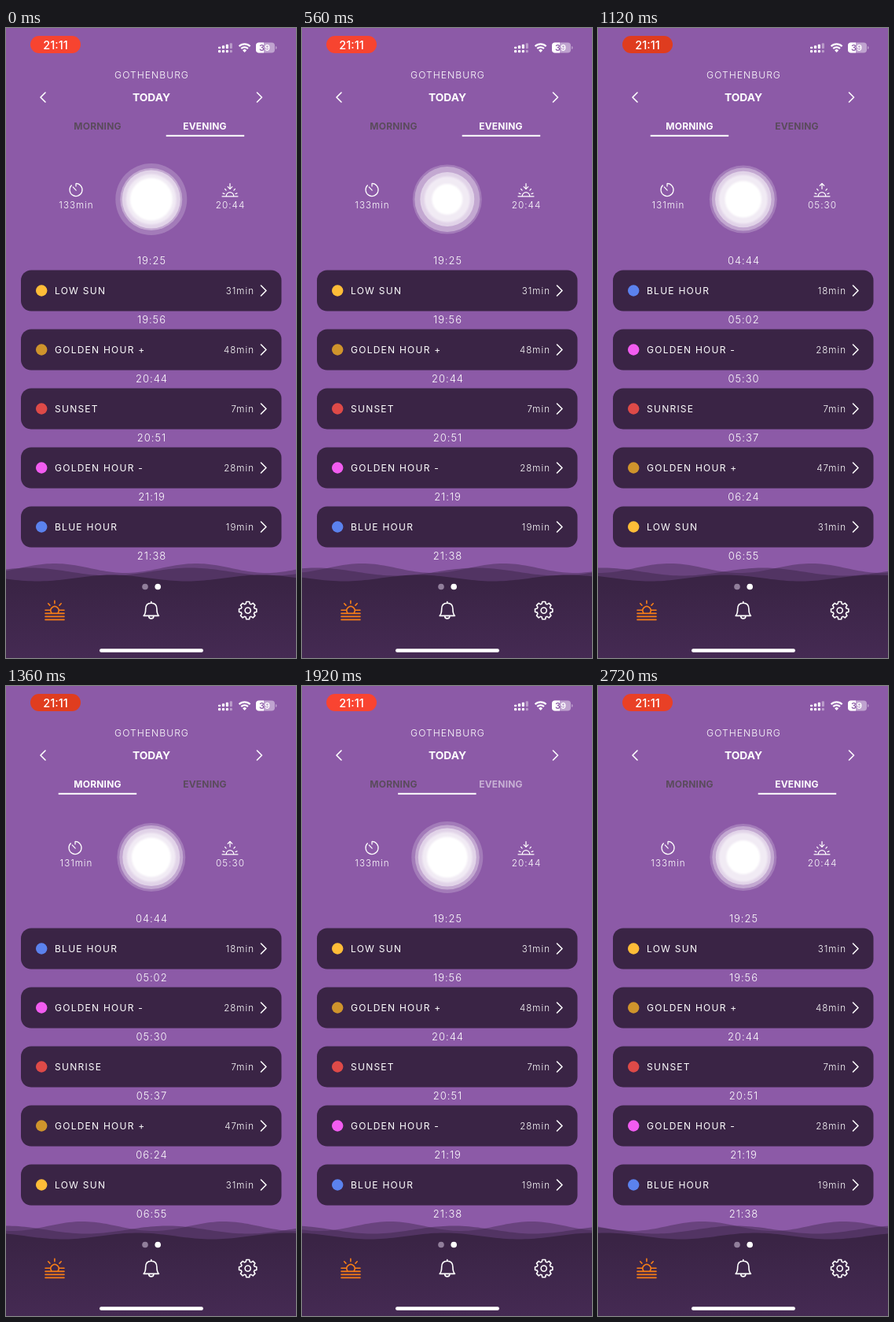
An HTML page for the animation above (2800 ms loop, 369 by 800 pixels).

```html
<!DOCTYPE html>
<html lang="en">
<head>
<meta charset="utf-8">
<title>Sun times</title>
<style>
html, body { margin: 0; width: 100%; height: 100%; overflow: hidden; background: #8c5aa7; }
svg { display: block; width: 369px; height: 800px; font-family: Inter, sans-serif; }
text { fill: #fff; }
.mid { text-anchor: middle; }
.end { text-anchor: end; }
.light { font-weight: 300; letter-spacing: 1px; }
.tab { font-size: 12px; font-weight: 700; letter-spacing: .2px; }
.line { fill: none; stroke: #fff; stroke-width: 1.6; stroke-linecap: round; stroke-linejoin: round; }
.thin { stroke-width: 1.25; }
.hot { stroke: #f97f16; }
</style>
</head>
<body>
<svg viewBox="0 0 369 800">
  <defs>
    <linearGradient id="floor" x1="0" y1="0" x2="0" y2="1">
      <stop offset="0" stop-color="#3a2445"/><stop offset="1" stop-color="#452a53"/>
    </linearGradient>
    <filter id="soft" x="-20%" y="-20%" width="140%" height="140%"><feGaussianBlur stdDeviation=".8"/></filter>
  </defs>
  <rect width="369" height="800" fill="#8c5aa7"/>

  <rect id="pill" x="31" y="10" width="64" height="22" rx="11"/>
  <text class="mid" x="63" y="26.5" font-size="14.5" font-weight="500">21:11</text>
  <g id="signal" fill="#fff"></g>
  <g fill="none" stroke="#fff" stroke-width="2.3">
    <path d="M296.6 23.2a10 10 0 0 1 14 0M299.3 26.2a6.2 6.2 0 0 1 8.6 0"/>
    <path d="M303.6 31l-2.5-2.6a3.5 3.5 0 0 1 5 0z" fill="#fff" stroke="none"/>
  </g>
  <rect x="318" y="18.5" width="24" height="13" rx="4" fill="#bfa3cf"/>
  <path d="M328 18.5h-6a4 4 0 0 0-4 4v5a4 4 0 0 0 4 4h6z" fill="#fff"/>
  <path d="M343 23v4q1.6-.6 1.6-2t-1.6-2z" fill="#bfa3cf"/>
  <text x="322" y="29" font-size="11" font-weight="600" style="fill:#8c5aa7">3<tspan fill="#fff">9</tspan></text>

  <text class="mid light" x="185.5" y="63.5" font-size="12.2">GOTHENBURG</text>
  <text class="mid" x="185" y="92.5" font-size="13.8" font-weight="700">TODAY</text>
  <path class="line" d="M50 82l-6 6 6 6M319.5 82l6 6-6 6"/>
  <text id="am" class="mid tab" x="116.5" y="128.5">MORNING</text>
  <text id="pm" class="mid tab" x="253" y="128.5">EVENING</text>
  <rect id="bar" y="135.8" width="99.5" height="2" fill="#fff"/>

  <g id="sun" fill="#fff"></g>

  <path id="timer" class="line thin" d="M0-4.6V-8A8 8 0 1 1-5.6-5.7M-3.8-3.6L.2.6"/>
  <text id="span" class="mid light" x="89.5" y="229" font-size="11.6"></text>
  <path class="line thin" d="M275 213.8h20M280.2 213.5a4.8 4.8 0 1 1 9.6 0M276 209.8l2 .8M294 209.8l-2 .8M278.6 204.4l1.5 1.7M291.4 204.4l-1.5 1.7M285 197.6v6.6"/>
  <path id="arrow" class="line thin"/>
  <text id="peak" class="mid light" x="285.5" y="229" font-size="11.8"></text>

  <g id="list"></g>

  <path id="w0" fill="#3a2445" opacity=".42"/>
  <path id="w1" fill="#3a2445" opacity=".48"/>
  <path id="w2" fill="#3a2445"/>
  <rect y="705" width="369" height="95" fill="url(#floor)"/>
  <circle cx="177" cy="709.5" r="3.8" fill="#917f9b"/>
  <circle cx="193.2" cy="709.5" r="3.8" fill="#fff"/>

  <path class="line hot" d="M50 739.2h6.5M67.5 739.2h6.5M50 743.4h24M50 747.4h24M50 751.4h24M57.7 742.4a5.1 5.1 0 1 1 8.6 0M61.9 727.4v3.4M53.7 730.8l2.2 2.3M70.2 730.8l-2.2 2.3"/>
  <path class="line" d="M184.8 728.6v1.6M175.2 746.4h19.2c-2-2-2.5-3.6-2.5-8.6 0-4.8-2.8-7.6-7.1-7.6s-7.1 2.8-7.1 7.6c0 5-.5 6.600-2.500 8.600zM181.700 746.800a3.100 3.100 0 0 0 6.200 0"/>
  <path id="gear" class="line"/>
  <circle class="line" cx="307.700" cy="739.600" r="3.600"/>
  <rect x="119" y="788.300" width="132" height="4.400" rx="2.200" fill="#fff"/>
</svg>
<script>
const LOOP = 2800, STEP = 80, SLIDE = 250;
const TO_AM = 777, TO_PM = 1811;
const $ = id => document.getElementById(id);
const set = (el, attrs) => { for (const k in attrs) el.setAttribute(k, attrs[k]); };
const clamp = v => Math.max(0, Math.min(1, v));
const smooth = v => v * v * (3 - 2 * v);
const mix = (a, b, k) => a + (b - a) * k;

const COLORS = { 'LOW SUN': '#ffbd38', 'GOLDEN HOUR +': '#cf942c', 'SUNSET': '#de4a48',
  'SUNRISE': '#de4a48', 'GOLDEN HOUR -': '#f25cf0', 'BLUE HOUR': '#5b82ee' };
const EVENING = {
  span: '133min', peak: '20:44', timerX: 89, arrow: 'M282.200 201.600l2.800 2.800 2.800-2.800',
  names: ['LOW SUN', 'GOLDEN HOUR +', 'SUNSET', 'GOLDEN HOUR -', 'BLUE HOUR'],
  mins: [31, 48, 7, 28, 19],
  times: ['19:25', '19:56', '20:44', '20:51', '21:19', '21:38']
};
const MORNING = {
  span: '131min', peak: '05:30', timerX: 88, arrow: 'M282.200 200.200l2.800-2.800 2.800 2.800',
  names: ['BLUE HOUR', 'GOLDEN HOUR -', 'SUNRISE', 'GOLDEN HOUR +', 'LOW SUN'],
  mins: [18, 28, 7, 47, 31],
  times: ['04:44', '05:02', '05:30', '05:37', '06:24', '06:55']
};

function timeLabel(text, i) {
  return `<text class="mid light" x="185.500" y="${299.8 + 75 * i}" font-size="13">${text}</text>`;
}

function row(day, i) {
  const name = day.names[i], y = 333.5 + 75 * i;
  return `<rect x="19" y="${y - 26}" width="331.500" height="52" rx="13" fill="#3a2445"/>
    <circle cx="45.200" cy="${y}" r="7.200" fill="${COLORS[name]}"/>
    <text x="62" y="${y + 4.5}" font-size="12" letter-spacing="1.250">${name}</text>
    <text class="end light" x="316" y="${y + 4.2}" font-size="11.600">${day.mins[i]}min</text>
    <path class="line" d="M324.500 ${y - 6.500}l6.500 6.500-6.500 6.500"/>`;
}

let shown;
function show(day) {
  if (day === shown) return;
  shown = day;
  $('span').textContent = day.span;
  $('peak').textContent = day.peak;
  set($('timer'), { transform: `translate(${day.timerX} 205.500)` });
  set($('arrow'), { d: day.arrow });
  $('list').innerHTML = day.names.map((_, i) => row(day, i)).join('') + day.times.map(timeLabel).join('');
}

// Each glow layer: time followed by five radii, outermost first.
const GLOW = [
  [0, 45.5, 39.5, 37, 32, 27],
  [560, 44, 41.5, 34.5, 29, 19.5],
  [880, 42.5, 39.5, 35, 31, 21.5],
  [1360, 43.5, 40.5, 36.5, 31, 25],
  [1920, 45.500, 41, 37, 32, 26],
  [2400, 45.500, 42, 36.500, 30, 19.500],
  [2720, 42.500, 39.500, 35, 31, 21.500],
  [2800, 42.500, 39, 35, 31, 22.500]
];
const ALPHA = [.2, .34, .5, .55, 1];
$('sun').innerHTML = ALPHA.map((a, i) =>
  `<circle cx="184.800" cy="217.500" opacity="${a}"${i > 2 ? ' filter="url(#soft)"' : ''}/>`).join('');
const rings = [...$('sun').children];

function glow(t) {
  const i = GLOW.findIndex(k => k[0] > t), a = GLOW[i - 1], b = GLOW[i];
  const k = smooth((t - a[0]) / (b[0] - a[0]));
  rings.forEach((c, n) => c.setAttribute('r', mix(a[n + 1], b[n + 1], k)));
}

// Sine crest at x = peak, filled down to the bottom panel.
function wave(id, mid, amp, len, peak) {
  let d = 'M0 706';
  for (let x = 0; x <= 372; x += 4)
    d += `L${x} ${(mid - amp * Math.cos((x - peak) / len * 2 * Math.PI)).toFixed(2)}`;
  set($(id), { d: d + 'V706Z' });
}

function tabs(t) {
  const am = t >= TO_AM && t < TO_PM;
  const p = clamp((t - (am ? TO_AM : TO_PM)) / SLIDE);
  const moving = t >= TO_AM;
  const k = moving ? smooth(p) : 1;
  show(am ? MORNING : EVENING);
  set($('bar'), { x: am ? mix(203.7, 66.7, k) : mix(66.7, 203.7, k) });
  const [on, off] = am ? [$('am'), $('pm')] : [$('pm'), $('am')];
  on.style.fill = '#fff';
  on.style.opacity = moving ? mix(.15, 1, p) : 1;
  off.style.fill = '#5a4b5c';
  off.style.opacity = 1;
}

function draw(t) {
  tabs(t);
  glow(t);
  const beat = .5 + .5 * Math.cos((t - 280) / 1880 * 2 * Math.PI);
  set($('pill'), { fill: `rgb(${mix(222, 254, beat)},${mix(60, 70, beat)},${mix(30, 52, beat)})` });
  const s = t / 1000;
  wave('w0', 686, 6, 180, 62 + 26 * s);
  wave('w1', 690.5, 5, 205, 30 - 22 * s);
  wave('w2', 698.5, 4, 190, 135 + 24 * s);
}

let bars = '';
for (let i = 0; i < 4; i++) {
  const h = 2.6 + 1.5 * i, x = 270 + 4.9 * i, o = i > 2 ? .4 : 1;
  bars += `<rect x="${x}" y="${26.3 - h}" width="3.200" height="${h}" rx="1" opacity="${o}"/>
    <rect x="${x}" y="28" width="3.200" height="3.200" rx="1" opacity="${o}"/>`;
}
$('signal').innerHTML = bars;

let teeth = '';
for (let i = 0; i < 8; i++)
  for (const [off, r] of [[-.29, 8.800], [-.17, 11.300], [.17, 11.300], [.29, 8.800]]) {
    const a = i * Math.PI / 4 + off;
    teeth += `${teeth ? 'L' : 'M'}${(307.7 + r * Math.cos(a)).toFixed(2)} ${(739.6 + r * Math.sin(a)).toFixed(2)}`;
  }
set($('gear'), { d: teeth + 'Z' });

const start = performance.now();
function tick() {
  const t = (performance.now() - start) % LOOP;
  draw(Math.floor(t / STEP) * STEP);
  requestAnimationFrame(tick);
}
tick();
</script>
</body>
</html>
```
